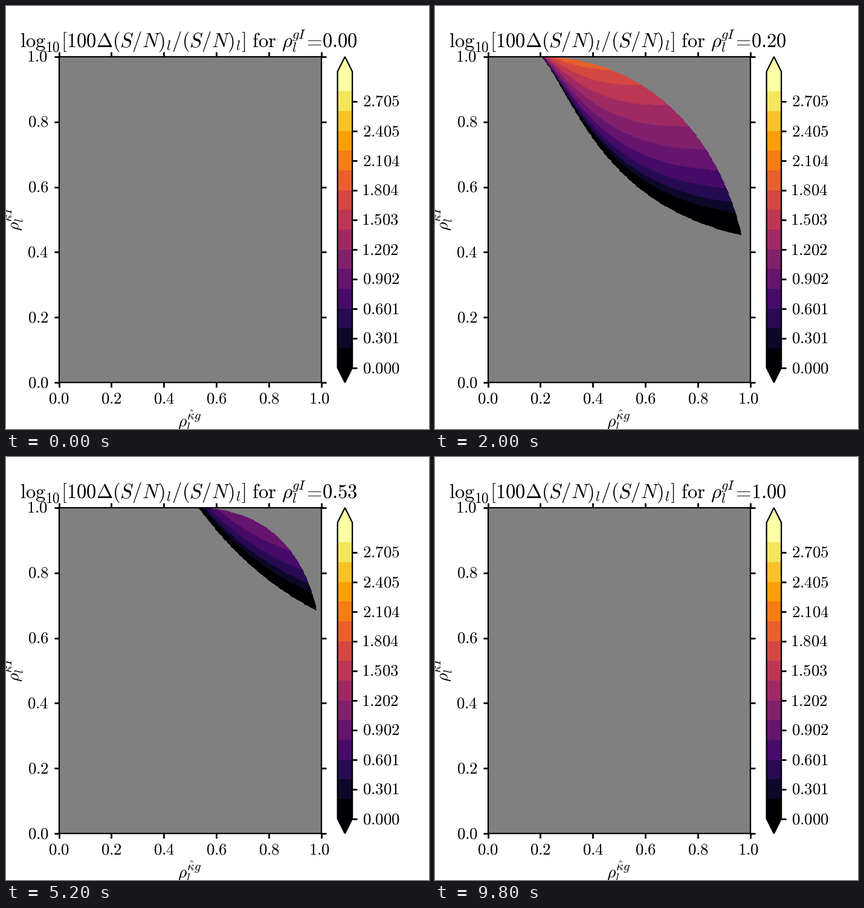
Recreate the animation shown at these times as a matplotlib script. Size 700 px wide and 700 px high, loop 10000 ms.

```python
import matplotlib.pyplot as plt
import numpy as np
from matplotlib.animation import FuncAnimation

SIZE = 700
DPI = 200
FRAMES = 50
VMAX = 3.006
LABEL, TITLE = 9.7, 11.8

plt.rcParams.update({
    "mathtext.fontset": "cm",
    "axes.linewidth": 0.8,
    "xtick.top": True, "ytick.right": True,
    "xtick.major.size": 3, "ytick.major.size": 3,
    "xtick.major.width": 1, "ytick.major.width": 1,
})

fig = plt.figure(figsize=(SIZE / DPI, SIZE / DPI), dpi=DPI, facecolor="white")
ax = fig.add_subplot()


def put(s, x, y, ha="left", size=LABEL, rotation=0):
    """Math text with its baseline at pixel (x, y) from the top left."""
    return fig.text(x / SIZE, 1 - y / SIZE, f"${s}$", ha=ha, va="baseline",
                    fontsize=size, color="black", rotation=rotation,
                    rotation_mode="anchor")


def put_rho(sup, x, y, size, small, rotation=0):
    """The symbol rho with subscript l and the given superscript."""
    em = size * DPI / 72
    parts = [(r"\rho", 0, 0, size), ("l", 0.52, 0.247, 0.7 * size),
             (sup, 0.53, -0.413, small)]
    for s, dx, dy, pt in parts:
        if rotation:
            dx, dy = dy, -dx
        put(s, x + dx * em, y + dy * em, size=pt, rotation=rotation)


grid = np.linspace(0, 1, 500)
X, Y = np.meshgrid(grid, grid)


def gain(r):
    """log10 of the percent gain in S/N after cleaning with weight f."""
    f = (Y + r * X) / (1 + 7 * r**2)
    signal = X - f * r
    noise = 1 - 2 * f * Y + f**2
    det = 1 + 2 * r * X * Y - X**2 - Y**2 - r**2
    with np.errstate(all="ignore"):
        before = X / np.sqrt(1 + X**2)
        after = signal / np.sqrt(noise + signal**2)
        delta = after / before - 1
        ok = (det > 1e-12) & (delta > 0) & (r > 0)
        return np.ma.masked_where(~ok, np.log10(100 * np.where(ok, delta, 1)))


cmap = plt.get_cmap("inferno", 15).copy()
cmap.set_bad("gray")
im = ax.imshow(gain(0), origin="lower", extent=(0, 1, 0, 1), aspect="auto",
               cmap=cmap, vmin=0, vmax=VMAX, interpolation="nearest")
ticks = np.arange(6) / 5
ax.set_xticks(ticks, [""] * 6)
ax.set_yticks(ticks, [""] * 6)

levels = VMAX / 10 * np.arange(10)
bar = fig.colorbar(im, ax=ax, extend="both", aspect=22)
bar.set_ticks(levels, labels=[""] * 10)

# tick labels; a leading 1 sits a little further left
for t in ticks:
    nudge = 2 * (t == 1)
    put(f"{t:.1f}", 88 + 434 * t - 1.5 * nudge, 658, "center")
    put(f"{t:.1f}", 71 - nudge, 631 - 539 * t, "right")
for k, v in enumerate(levels):
    label = f"{v:.3f}"
    put(label, 590 - 2 * (label[0] == "1"), 607 - 49 * k)

# axis labels
put_rho(r"\hat{\kappa} g", 284, 696, 10, 7.6)
put_rho(r"\hat{\kappa} I", 22, 372, 10, 7.6, rotation=90)

# title
put(r"\mathrm{log}", 23, 68, size=TITLE)
put("10", 65, 76, size=8.4)
put(r"[100\Delta", 91, 68, size=TITLE)
put("(S/N)_l/", 176, 68, size=TITLE)
put("(S/N)_l]", 397, 68, "right", size=TITLE)
put(r"\mathrm{for}", 407, 68, size=TITLE)
put_rho("gI", 456, 68, TITLE, 8.2)
put("=", 523, 68, "right", size=TITLE)
value = put("0.00", 582, 68, "right", size=TITLE)


def draw(i):
    r = i / (FRAMES - 1)
    im.set_data(gain(r))
    value.set_text(f"${r:.2f}$")
    return im, value


anim = FuncAnimation(fig, draw, frames=FRAMES, interval=200, repeat=True)
plt.show()
```
